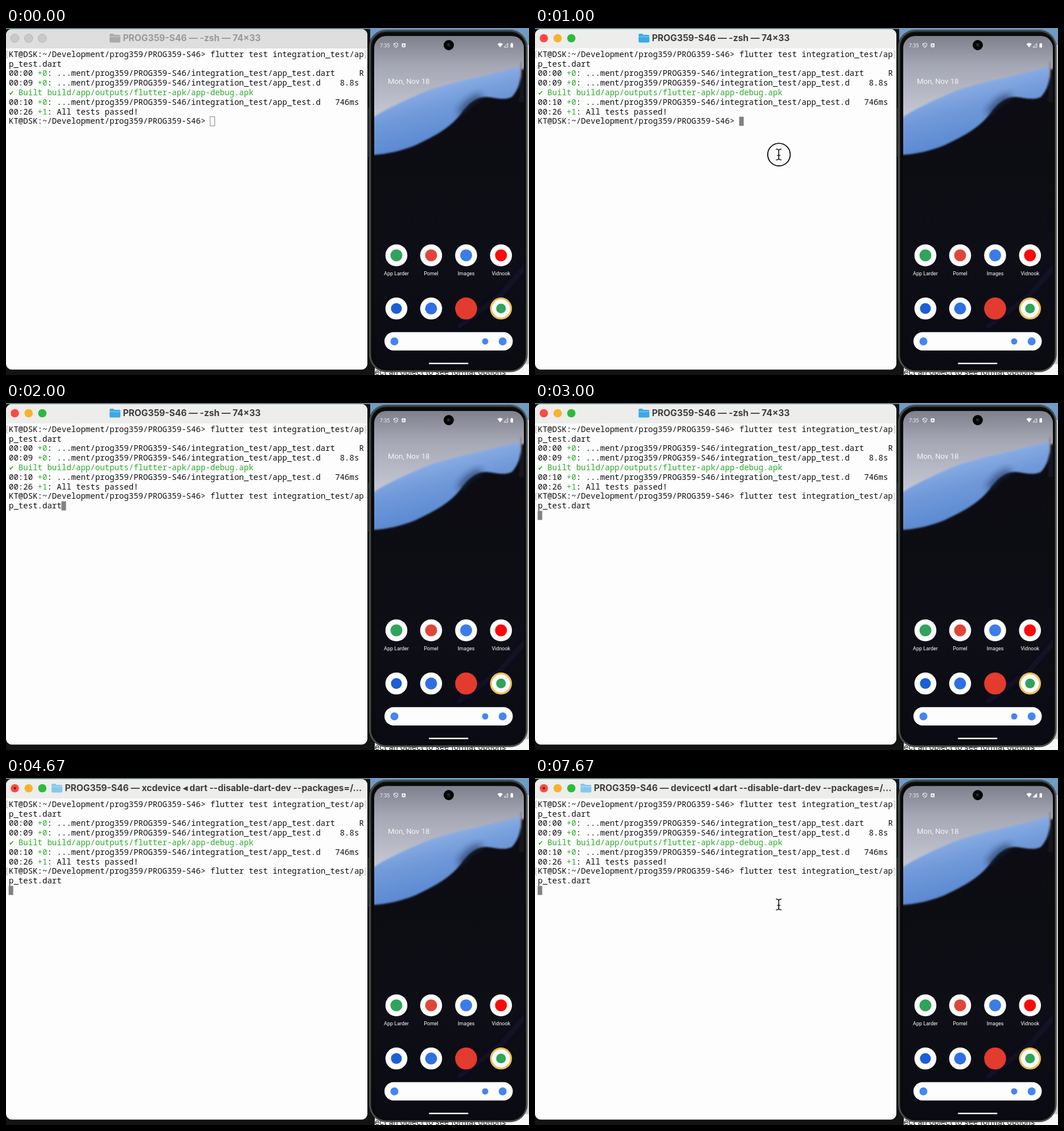
These frames come from a looping animation (919x609 px, 8000 ms). An HTML page:

```html
<!DOCTYPE html>
<html lang="en">
<head>
<meta charset="utf-8">
<title>Integration test run</title>
<style>
html, body { margin: 0; width: 100%; height: 100%; overflow: hidden; background: #111413; }
svg { display: block; width: 919px; height: 609px; }
text { white-space: pre; }
.mono { font: 500 14.05px "Noto Sans Mono", "DejaVu Sans Mono", monospace; }
.title { font: 700 15.6px Inter, "Liberation Sans", sans-serif; }
.phone { font-family: Roboto, "Open Sans", sans-serif; fill: #fff; }
</style>
</head>
<body>
<svg viewBox="0 0 919 609" xmlns="http://www.w3.org/2000/svg">
  <defs>
    <linearGradient id="sky" x1="0" y1="0" x2="0" y2="1">
      <stop offset="0" stop-color="#777985"/>
      <stop offset=".35" stop-color="#a5a7b4"/>
      <stop offset="1" stop-color="#ced1dc"/>
    </linearGradient>
    <linearGradient id="cloth" x1="0" y1=".2" x2=".35" y2="1">
      <stop offset="0" stop-color="#9dbcec"/>
      <stop offset=".5" stop-color="#7099d9"/>
      <stop offset="1" stop-color="#5484cf"/>
    </linearGradient>
    <linearGradient id="night" x1="0" y1="0" x2="0" y2="1">
      <stop offset="0" stop-color="#0b0b10"/>
      <stop offset=".7" stop-color="#0e0e16"/>
      <stop offset="1" stop-color="#0a0a12"/>
    </linearGradient>
    <filter id="soft" x="-20%" y="-20%" width="140%" height="140%"><feGaussianBlur stdDeviation="1.6"/></filter>
    <filter id="haze" x="-50%" y="-50%" width="200%" height="200%"><feGaussianBlur stdDeviation="6"/></filter>
    <clipPath id="screen"><rect x="647" y="14" width="263" height="584" rx="21"/></clipPath>
    <clipPath id="window"><rect x="0" y="2" width="635" height="597.5" rx="10"/></clipPath>
  </defs>

  <!-- desktop -->
  <rect width="919" height="609" fill="#111413"/>
  <rect width="640" height="2" fill="#5d8587"/>
  <rect x="640" width="279" height="30" fill="#6f9bc4"/>
  <rect x="900" y="30" width="19" height="579" fill="#c9ced3"/>
  <rect x="648" y="590" width="271" height="19" fill="#f8f8f8"/>
  <text x="648" y="608.5" font-family="Inter, sans-serif" font-size="14" fill="#222">ect an object to see format options</text>

  <!-- terminal -->
  <g clip-path="url(#window)">
    <rect y="2" width="635" height="598" fill="#fdfdfd"/>
    <rect id="bar" y="2" width="635" height="34"/>
    <g id="lights"></g>
    <circle id="dot" cx="15.5" cy="18" r="2.2" fill="#7a0c08"/>
    <g id="folder">
      <path d="M0 2q0-2 2-2h4.500l2 2h8.500q2 0 2 2v9.500q0 2-2 2h-15q-2 0-2-2z"/>
      <path d="M0 5.200h19" stroke="#fff" stroke-opacity=".45"/>
    </g>
    <text id="title" class="title" y="23.200"></text>
    <g id="rows" class="mono"></g>
    <g id="entry" class="mono"></g>
    <path id="marks" fill="none" stroke="#b4b4b4"/>
    <rect id="caret" width="8" height="16"/>
  </g>
  <g id="beam" fill="none" stroke="#111" stroke-width="1.600" stroke-linecap="round">
    <path d="M424 212.500q4 0 4.300 3v13q-.3 3-4.300 3M432.600 212.500q-4 0-4.300 3v13q.3 3 4.300 3M426 223.500h4.600"/>
  </g>
  <circle id="ring" cx="428.700" cy="222.200" r="19.800" fill="none" stroke="#111" stroke-width="1.900"/>

  <!-- phone -->
  <rect x="636" y="140" width="4" height="86" fill="#2e3231"/>
  <rect x="637.500" y="3" width="279" height="601" rx="31" fill="#252827"/>
  <rect x="639.500" y="4.500" width="275.500" height="598" rx="29" fill="none" stroke="#545957" stroke-width="1.800"/>
  <rect x="642" y="7.500" width="271" height="593" rx="26" fill="#090a0a"/>
  <g clip-path="url(#screen)">
    <rect x="647" y="14" width="263" height="584" fill="url(#night)"/>
    <g filter="url(#soft)">
      <path d="M640 5H918V66C904 74 895 84 860 96L640 180Z" fill="url(#sky)"/>
      <path d="M640 160C672 139 700 128 735 112C785 93 850 84 904 67C905 88 903 106 889 121C875 128 861 122 844 121C824 121 811 134 799 151C780 176 751 191 719 206C694 216 668 222 640 223Z" fill="url(#cloth)"/>
      <path d="M905 60V94" stroke="#8a6a5e" stroke-width="2"/>
      <path d="M906 72H920V130H901Z" fill="#15151c"/>
    </g>
    <path d="M836 121C816 122 806 138 797 150" fill="none" stroke="#1c2c50" stroke-opacity=".65" stroke-width="11" filter="url(#haze)"/>
    <path d="M918 412L868 470L790 528" fill="none" stroke="#171745" stroke-opacity=".45" stroke-width="9" filter="url(#haze)"/>
    <g id="home" class="phone"></g>
    <g fill="#fff">
      <path d="M863.500 28q4.800-3.600 9.600 0l-4.800 6z"/>
      <path id="signal" d="M875 33.700h6.700v-6.700z" stroke="#fff" stroke-width=".9"/>
      <path d="M886.500 27.500h1v-1h2.500v1h1v6.800h-4.500z"/>
    </g>
    <g fill="none" stroke="#fff" stroke-width="1">
      <path d="M681.500 27.500l3.500-1 3.500 1v3q-.5 2.500-3.500 3.800q-3-1.300-3.500-3.800zM682.300 28.300l5 4"/>
    </g>
    <rect x="695.500" y="27" width="6.500" height="6.800" rx="1" fill="#fff"/>
    <path d="M697 32.500l1.700-4 1.700 4M697.700 31.200h2" fill="none" stroke="#777985" stroke-width=".8"/>
    <circle cx="778" cy="30" r="9" fill="#050506"/>
    <circle cx="778" cy="30" r="3.200" fill="#1b1d22"/>
    <circle cx="777" cy="29" r="1" fill="#4a4d55"/>
  </g>
</svg>

<script>
const NS = "http://www.w3.org/2000/svg";
const $ = id => document.getElementById(id);
const COL = 8.43, LEFT = 5, BASE = 50.7, LINE = 16.8;
const INK = "#111", GREEN = "#2dab2d";

function add(parent, tag, attrs, label) {
  const el = document.createElementNS(NS, tag);
  for (const key in attrs) el.setAttribute(key, attrs[key]);
  if (label) el.textContent = label;
  parent.append(el);
  return el;
}
const disc = (parent, cx, cy, r, fill) => add(parent, "circle", { cx, cy, r, fill });
const show = (id, on) => $(id).style.display = on ? "" : "none";

function run(parent, row, col, words, fill = INK) {
  return add(parent, "text", { x: LEFT + col * COL, y: BASE + row * LINE, fill }, words);
}

// Terminal text
const DIR = "PROG359-S46";
const PROMPT = `KT@DSK:~/Development/prog359/${DIR}>`;
const CMD = "flutter test integration_test/ap";
const REST = "p_test.dart";
const SHORT = `...ment/prog359/${DIR}/integration_test/app_test.d`;
const rows = $("rows"), entry = $("entry");

function status(row, time, count, words, tail, col) {
  run(rows, row, 0, time);
  run(rows, row, 6, count, GREEN);
  run(rows, row, 8, ": " + words);
  if (tail) run(rows, row, col, tail);
}
run(rows, 0, 0, PROMPT + " " + CMD);
run(rows, 1, 0, REST);
status(2, "00:00", "+0", SHORT + "art", "R", 73);
status(3, "00:09", "+0", SHORT, "8.8s", 69);
run(rows, 4, 0, "✔", GREEN).setAttribute("style", "font: 11.5px 'DejaVu Sans', sans-serif");
run(rows, 4, 2, "Built build/app/outputs/flutter-apk/app-debug.apk", GREEN);
status(5, "00:10", "+0", SHORT, "746ms", 68);
status(6, "00:26", "+1", "All tests passed!");
run(rows, 7, 0, PROMPT);
run(entry, 7, 42, CMD);
run(entry, 8, 0, REST);

const lights = [15.5, 39.8, 63.8].map(x => disc($("lights"), x, 18, 7.3, "#ccc"));

// Home screen
const home = $("home");
const white = "#fdfdfd";
const xs = [686, 747, 808.5, 869.8];
add(home, "text", { x: 657, y: 33.7, "font-size": 9, opacity: .9 }, "7:35");
add(home, "text", { x: 671, y: 98, "font-size": 13.2, opacity: .88 }, "Mon, Nov 18");
[["App Larder", "#2fa45a"], ["Pomel", "#e0453a"], ["Images", "#3a7de8"], ["Vidnook", "#fa0a0a"]].forEach(([name, color], i) => {
  disc(home, xs[i], 399, 19.3, white);
  disc(home, xs[i], 399, 10.5, color);
  add(home, "text", { x: xs[i], y: 433.7, "font-size": 9, "text-anchor": "middle" }, name);
});
disc(home, xs[0], 492.3, 19.3, white);
disc(home, xs[0], 492.3, 9.5, "#1a5fd6");
disc(home, xs[1], 492.3, 19.3, white);
disc(home, xs[1], 492.3, 10.5, "#2f6fe2");
disc(home, xs[2], 492.3, 19.3, "#e33b2e");
disc(home, xs[3], 492.3, 19.3, "#eebf55");
disc(home, xs[3], 492.3, 16, white);
disc(home, xs[3], 492.3, 8.5, "#2fa45a");
add(home, "rect", { x: 665, y: 533.7, width: 225.5, height: 32.3, rx: 16.15, fill: white });
disc(home, 682.5, 550, 7, "#4285f4");
disc(home, 842, 550, 5.5, "#4285f4");
disc(home, 872.7, 550, 7, "#4285f4");
add(home, "rect", { x: 743, y: 587.5, width: 69.5, height: 2.6, rx: 1.3, fill: white });

// Each step overrides the state before it
const idle = `${DIR} — -zsh — 74×33`;
const busy = (job, tail) => `${DIR} — ${job} ◂ dart --disable-dart-dev --packages=/${tail}`;
const steps = [
  [0, { title: idle, active: false, typed: false, sent: false, busy: false, beam: false, ring: false, full: false }],
  [670, { beam: true }],
  [1000, { active: true, ring: true }],
  [1330, { ring: false }],
  [1670, { typed: true, beam: false }],
  [3000, { sent: true }],
  [3330, { busy: true, title: busy("sw_vers", "U...") }],
  [4330, { title: busy("xcdevice", "...") }],
  [5670, { beam: true, full: true }],
  [7000, { title: busy("devicectl", "...") }]
];
const brackets = y => `M4 ${y}h-2.500v12h2.500M630 ${y}h2.500v12h-2.500`;

function draw(s) {
  const on = s.active;
  $("bar").setAttribute("fill", on ? "#ededeb" : "#dedede");
  ["#fc4a45", "#f6b42c", "#2cbb3d"].forEach((color, i) => {
    lights[i].setAttribute("fill", on ? color : "#c9c9c9");
    lights[i].setAttribute("stroke", on ? "none" : "#b3b3b3");
  });
  show("dot", s.busy);
  $("folder").setAttribute("transform", `translate(${s.busy ? 80 : 182} 10)`);
  $("folder").setAttribute("fill", !on ? "#a9a9a9" : s.busy ? "#86c8ec" : "#3aa9e8");
  const title = $("title");
  title.textContent = s.title;
  title.setAttribute("x", s.busy ? 103.5 : 205.5);
  title.setAttribute("fill", on ? "#3d3d3d" : "#989898");
  show("entry", s.typed);
  $("marks").setAttribute("d", brackets(40.5) + (s.sent ? brackets(158.1) : ""));
  const [col, row] = s.sent ? [0, 9] : s.typed ? [11, 8] : [42, 7];
  const caret = $("caret");
  caret.setAttribute("x", LEFT + col * COL - .3);
  caret.setAttribute("y", BASE + row * LINE - 12.6);
  caret.setAttribute("fill", on ? "#828282" : "none");
  caret.setAttribute("stroke", on ? "none" : "#828282");
  show("beam", s.beam);
  show("ring", s.ring);
  $("signal").setAttribute("fill", s.full ? "#fff" : "none");
}

const LOOP = 8000;
let last = -1;
function frame(now) {
  const t = now % LOOP;
  const past = steps.filter(step => step[0] <= t);
  if (past.length !== last) {
    last = past.length;
    draw(Object.assign({}, ...past.map(step => step[1])));
  }
  requestAnimationFrame(frame);
}
frame(0);
</script>
</body>
</html>
```
